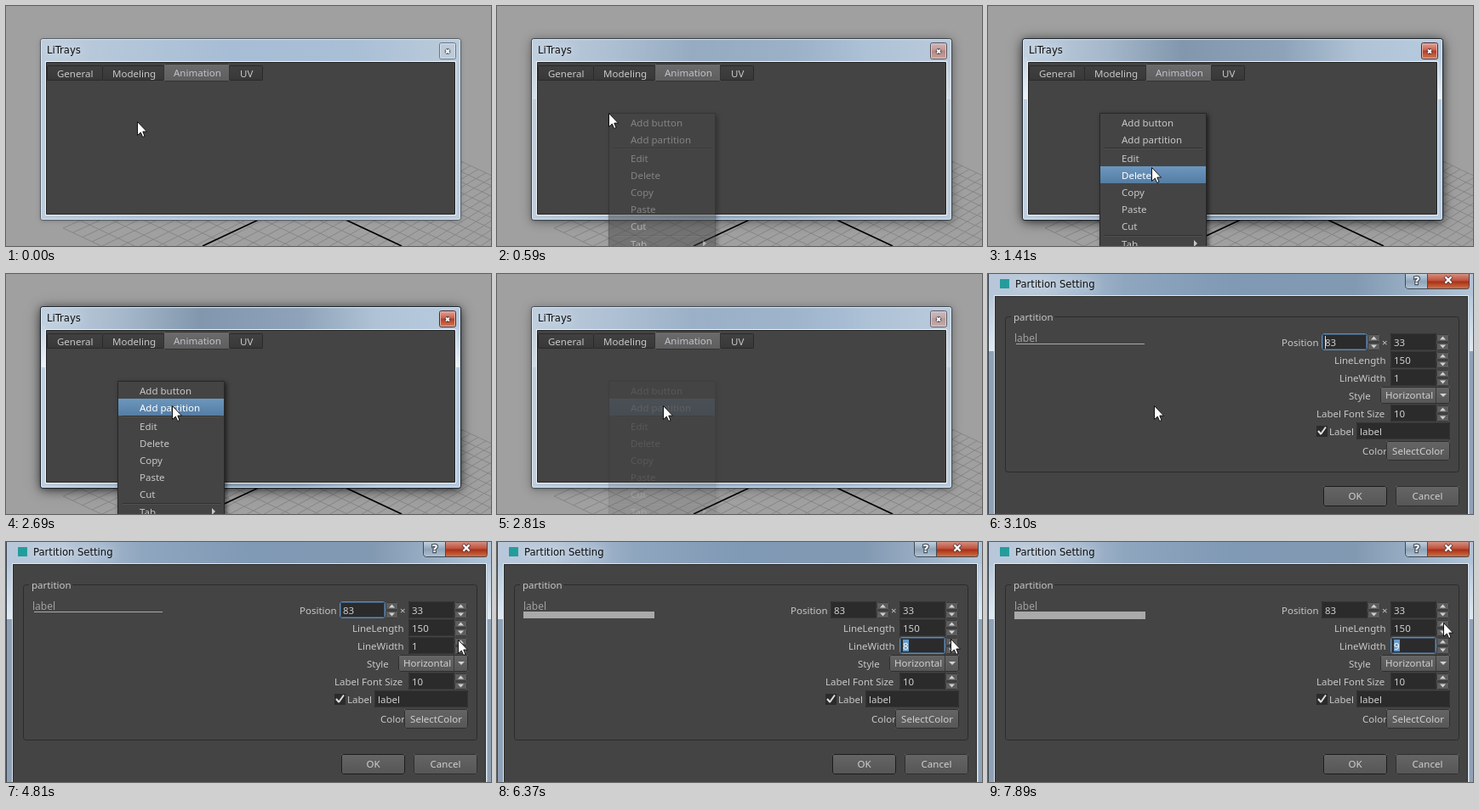
Animation, 570 px wide and 283 px high, one loop 7.99 s. Source, as an HTML page with a canvas:

```html
<!DOCTYPE html>
<html lang="en">
<head>
<meta charset="utf-8">
<title>Partition dialog</title>
<style>
html, body { margin: 0; width: 100%; height: 100%; overflow: hidden; background: #a0a0a0; }
canvas { display: block; width: 570px; height: 283px; }
</style>
</head>
<body>
<canvas id="stage" width="570" height="283"></canvas>
<script>
const screen2d = document.getElementById('stage').getContext('2d');
const layer = document.createElement('canvas');
layer.width = 570;
layer.height = 283;
const layer2d = layer.getContext('2d');
let ctx = screen2d;

const LOOP = 7990;
const UI = '11.5px "Noto Sans", "Open Sans", sans-serif';
const TITLE = '11.6px "DejaVu Sans", sans-serif';

// time, x, y of the pointer tip
const PATH = [
  [0, 154, 136], [350, 131, 126], [1080, 131, 126], [1250, 190, 192],
  [1410, 192, 190], [1780, 195, 155], [3290, 195, 155], [3530, 347, 144],
  [3760, 347, 144], [4560, 515, 117], [4810, 531, 115], [5960, 531, 115],
  [6180, 533, 113], [6560, 533, 114], [6750, 534, 118], [7110, 534, 101],
  [7210, 534, 101], [7270, 534, 99], [7530, 534, 99], [7650, 534, 97],
  [7780, 534, 97], [7890, 535, 95]
];
// moments at which the line grows by one pixel
const CLICKS = [4990, 5460, 5650, 5770, 5960, 6180, 6370, 6560];
const MENU = [['Add button', 138], ['Add partition', 158], ['Edit', 180], ['Delete', 200],
  ['Copy', 220], ['Paste', 240], ['Cut', 260], ['Tab', 281]];

const ramp = (t, a, b) => Math.min(1, Math.max(0, (t - a) / (b - a)));

function rect(x, y, w, h, fill) {
  ctx.fillStyle = fill;
  ctx.fillRect(x, y, w, h);
}

function frame(x, y, w, h, color, r = 0) {
  ctx.strokeStyle = color;
  ctx.lineWidth = 1;
  ctx.beginPath();
  ctx.roundRect(x + .5, y + .5, w - 1, h - 1, r);
  ctx.stroke();
}

function poly(points, fill) {
  ctx.beginPath();
  points.forEach(([x, y]) => ctx.lineTo(x, y));
  ctx.closePath();
  ctx.fillStyle = fill;
  ctx.fill();
}

function line(x1, y1, x2, y2, color, width = 1) {
  ctx.strokeStyle = color;
  ctx.lineWidth = width;
  ctx.beginPath();
  ctx.moveTo(x1, y1);
  ctx.lineTo(x2, y2);
  ctx.stroke();
}

function cross(x, y, r, width, color) {
  line(x - r, y - r, x + r, y + r, color, width);
  line(x - r, y + r, x + r, y - r, color, width);
}

// text placed by its left edge and the middle of its capitals
function text(str, x, mid, color = '#c8c8c8', font = UI, align = 'left') {
  ctx.font = font;
  ctx.textAlign = align;
  ctx.fillStyle = color;
  ctx.fillText(str, x, mid + 4);
}

function windowTitle(str, x, mid) {
  ctx.save();
  ctx.shadowColor = 'rgba(255,255,255,.8)';
  ctx.shadowBlur = 12;
  text(str, x, mid, '#101010', TITLE);
  ctx.restore();
}

function gradient(x1, y1, x2, y2, ...stops) {
  const g = ctx.createLinearGradient(x1, y1, x2, y2);
  stops.forEach(([p, c]) => g.addColorStop(p, c));
  return g;
}

// floor plane in perspective
function floorPoint(u, v) {
  const w = .556 - .112 * v;
  const x = 218 + u * 100.6 - v * 188.2;
  const y = 64.5 + u * 47.3 + v * 51.8;
  return [x / w, y / w];
}

function backdrop() {
  rect(0, 0, 570, 283, '#a0a0a0');
  for (let i = 0; i <= 32; i++) {
    const k = i / 20;
    line(...floorPoint(k, 0), ...floorPoint(k, 1), '#868686');
    if (k <= 1) line(...floorPoint(0, k), ...floorPoint(1.6, k), '#868686');
  }
  line(348, 228, 231, 283, '#000', 1.7);
  line(348, 228, 465, 283, '#000', 1.7);
}

function tab(label, x, w, tx) {
  rect(x, 70, w, 18, gradient(0, 70, 0, 88, [0, '#414141'], [1, '#383838']));
  frame(x, 70, w, 18, '#2a2a2a', 1);
  text(label, tx, 79.5);
}

function shelf(active) {
  ctx.save();
  ctx.shadowColor = active ? 'rgba(0,0,0,.75)' : 'rgba(0,0,0,.3)';
  ctx.shadowBlur = active ? 14 : 5;
  ctx.shadowOffsetY = active ? 2 : 1;
  rect(41, 39, 493, 213, '#b5c7da');
  ctx.restore();

  rect(41, 39, 493, 213, active
    ? gradient(41, 0, 534, 0, [0, '#c0d0e0'], [.2, '#a5b7ca'], [.38, '#8297ad'], [.62, '#8ea3b9'], [.8, '#b0c3d6'], [1, '#b7cbdf'])
    : gradient(41, 0, 534, 0, [0, '#bdccdc'], [.45, '#a7bdd5'], [.75, '#a9bfd6'], [1, '#bccbda']));
  if (active) {
    rect(42, 60, 4, 50, gradient(0, 60, 0, 110, [0, '#c5d4e3'], [1, '#edf3f8']));
    rect(529, 60, 4, 50, gradient(0, 60, 0, 110, [0, '#b7cbdf'], [1, '#edf3f8']));
  }
  frame(40, 38, 495, 215, active ? '#1f2730' : '#56606a', 3);
  frame(41, 39, 493, 213, '#dce6ef', 2);
  frame(46, 65, 483, 182, '#f0f4f7');
  frame(47, 66, 481, 180, '#252525');
  rect(48, 67, 479, 178, '#444');
  windowTitle('LiTrays', 48, 51.5);

  rect(510, 44, 18, 18, active
    ? gradient(0, 44, 0, 62, [0, '#dfa397'], [.45, '#c9614e'], [.5, '#b53c24'], [1, '#d17a52'])
    : '#bccbd9');
  frame(509, 43, 20, 20, active ? '#49262a' : '#667584', 2);
  frame(510, 44, 18, 18, active ? '#e6b5a8' : '#d7e1ea', 1);
  cross(519, 53.5, 2.3, 3.8, active ? '#4e3135' : '#4b5661');
  cross(519, 53.5, 2, 1.8, '#fff');

  tab('General', 48, 66, 60);
  tab('Modeling', 113, 73, 125);
  tab('UV', 262, 40, 275);
  rect(185, 68, 78, 21, gradient(0, 68, 0, 89, [0, '#6b6b6b'], [1, '#5e5e5e']));
  frame(185, 68, 78, 21, '#333', 1);
  text('Animation', 197, 78.5, '#c2c2cf');
}

function menu(pointerY) {
  ctx.save();
  ctx.shadowColor = 'rgba(0,0,0,.6)';
  ctx.shadowBlur = 5;
  ctx.shadowOffsetX = ctx.shadowOffsetY = 2;
  rect(131, 126, 126, 170, '#444');
  ctx.restore();
  frame(131, 126, 126, 170, '#272727');
  for (const y of [167, 270]) {
    rect(137, y, 115, 1, '#303030');
    rect(137, y + 1, 115, 1, '#505050');
  }
  for (const [label, mid] of MENU) {
    const top = mid - 11;
    const hot = pointerY > 128 && pointerY >= top && pointerY < top + 20;
    if (hot) rect(132, top, 124, 20, gradient(0, top, 0, top + 20, [0, '#6d97be'], [1, '#557da4']));
    text(label, 157, mid, hot ? '#fff' : '#c8c8c8');
  }
  poly([[242, 276], [246, 280], [242, 284]], '#c8c8c8');
}

function arrow(x, y, up, r = 3.5) {
  const d = up ? -2 : 2;
  poly([[x - r, y - d], [x + r, y - d], [x, y + d]], '#d0d0d0');
}

function field(x, y, w, h, value, focus) {
  rect(x, y, w, h, '#2b2b2b');
  frame(x, y, w, h, focus ? '#6389ae' : '#353535', 2);
  if (focus) frame(x + 1, y + 1, w - 2, h - 2, '#3f5a76', 1);
  text(value, x + 4, y + h / 2 + .5, '#d0d0d0');
}

function spin(x, mid, value, focus) {
  field(x - 1, mid - 10.5, 54, 20, value, focus);
  for (const up of [true, false]) {
    const y = up ? mid - 9.5 : mid + .5;
    rect(x + 53, y, 15, 9, '#5d5d5d');
    frame(x + 53, y, 15, 9, '#3a3a3a', 1);
    arrow(x + 60.5, y + 4.5, up);
  }
}

function button(label, x, y, w, h, edge = '#2f2f2f') {
  rect(x, y, w, h, gradient(0, y, 0, y + h, [0, '#656565'], [1, '#565656']));
  frame(x, y, w, h, edge, 2);
  text(label, x + w / 2, y + h / 2, '#d0d0d0', UI, 'center');
}

function dialogChrome() {
  rect(0, -4, 574, 296, gradient(0, 0, 574, 0,
    [0, '#b8c8da'], [.12, '#b6c6d8'], [.28, '#8fa6bf'], [.5, '#8099b4'], [.75, '#8299b2'], [1, '#b3c6d9']));
  for (const x of [1, 566]) {
    rect(x, 26, 6, 65, gradient(0, 26, 0, 91, [0, '#b6c9dc'], [1, '#e1eaf2']));
    rect(x, 91, 6, 195, '#8fa1b5');
  }
  frame(0, -4, 574, 296, '#3b4550', 3);
  rect(7, 25, 558, 260, '#dfe8f0');
  rect(8, 26, 556, 258, '#444');
  frame(8, 26, 556, 258, '#2e2e2e');

  rect(14, 6, 11, 11, '#239c9c');
  windowTitle('Partition Setting', 32, 12);

  rect(490, -4, 26, 22, gradient(0, 0, 0, 18, [0, '#c2d0de'], [.5, '#90a4b8'], [1, '#b2c5d7']));
  rect(516, -4, 49, 22, gradient(0, 0, 0, 18, [0, '#d48f80'], [.45, '#bd4e39'], [.5, '#a92e17'], [1, '#d37948']));
  frame(490, -4, 76, 22, '#414a55', 3);
  rect(516, 0, 1, 18, '#414a55');
  ctx.lineWidth = 2.5;
  ctx.strokeStyle = '#4c5866';
  ctx.font = 'bold 13px "DejaVu Sans", sans-serif';
  ctx.textAlign = 'center';
  ctx.strokeText('?', 504, 11.5);
  text('?', 504, 7.5, '#fff', ctx.font, 'center');
  cross(541, 7, 4, 4, '#5a3438');
  cross(541, 7, 3.6, 2.2, '#fff');
}

function dialog(t) {
  const count = 1 + CLICKS.filter(c => t >= c).length;
  const editing = count > 1;
  dialogChrome();

  frame(20, 50, 534, 184, '#2b2b2b', 3);
  rect(27, 49, 51, 3, '#444');
  text('partition', 30, 50.5);

  text('label', 31, 75.5, '#a0a0a0', '12px "Noto Sans", "Open Sans", sans-serif');
  if (editing) rect(31, 82, 154, count, '#aaa');
  else rect(33, 82, 151, 1, '#aaa');

  text('Position', 345, 80.5);
  spin(393, 80.5, '83', !editing);
  const caretOn = Math.floor((t - 2890) / 530) % 2 === 0;
  if (!editing && caretOn) rect(396, 73, 1, 15, '#e0e0e0');
  text('×', 463, 80.5);
  spin(474, 80.5, '33');
  text('LineLength', 407, 101.5);
  spin(474, 101.5, '150');
  text('LineWidth', 413, 122.5);
  spin(474, 122.5, editing ? '' : '1', editing);
  if (editing) {
    rect(477, 115, 7, 14, '#6c9bc5');
    text(count, 477, 122.5, '#fff');
  }

  text('Style', 424, 143.5);
  button('', 461, 133, 82, 20);
  text('Horizontal', 467, 143, '#d0d0d0');
  rect(526, 134, 1, 18, '#3a3a3a');
  arrow(535, 143, false, 4);

  text('Label Font Size', 386, 164.5);
  spin(474, 164.5, '10');

  rect(386, 179, 13, 13, '#2b2b2b');
  line(388, 185, 391.5, 189, '#e0e0e0', 2);
  line(391, 189, 397, 180.5, '#e0e0e0', 2);
  text('Label', 401, 185.5);
  field(433, 175, 110, 20, 'label');

  text('Color', 440, 208.5);
  button('SelectColor', 468, 197, 75, 23);
  button('OK', 394, 250, 75, 24, '#1c1c1c');
  button('Cancel', 479, 250, 75, 24);
}

function pointerAt(t) {
  const i = PATH.findIndex(p => p[0] > t);
  if (i < 0) return PATH[PATH.length - 1].slice(1);
  const [t0, x0, y0] = PATH[i - 1], [t1, x1, y1] = PATH[i];
  const k = ramp(t, t0, t1);
  return [Math.round(x0 + (x1 - x0) * k), Math.round(y0 + (y1 - y0) * k)];
}

function pointer(x, y) {
  const shape = [[0, 0], [0, 16], [3.8, 12.6], [6.2, 18], [8.5, 17], [6.3, 11.6], [11, 11.6]];
  poly(shape.map(([dx, dy]) => [x + .5 + dx, y + .5 + dy]), '#fff');
  ctx.strokeStyle = '#111';
  ctx.lineWidth = 1;
  ctx.stroke();
}

// draws a whole group on its own layer, then blends it once
function blend(alpha, draw) {
  if (alpha <= 0) return;
  ctx = layer2d;
  ctx.clearRect(0, 0, 570, 283);
  ctx.save();
  draw();
  ctx.restore();
  ctx = screen2d;
  ctx.globalAlpha = alpha;
  ctx.drawImage(layer, 0, 0);
  ctx.globalAlpha = 1;
}

function render(t) {
  const [px, py] = pointerAt(t);
  const shown = ramp(t, 500, 690);
  const open = 1 - (1 - ramp(t, 2850, 3080)) ** 3;
  if (open < 1) {
    backdrop();
    shelf(false);
    blend(shown * (1 - ramp(t, 2700, 2870)), () => shelf(true));
    blend(shown * (1 - ramp(t, 2700, 2830)), () => menu(py));
  }
  blend(open, () => {
    const s = .9 + .1 * open;
    ctx.translate(225 * (1 - s), 90 * (1 - s));
    ctx.scale(s, s);
    dialog(t);
  });
  pointer(px, py);
}

const start = performance.now();
function tick() {
  render((performance.now() - start) % LOOP);
  requestAnimationFrame(tick);
}
tick();
</script>
</body>
</html>
```
